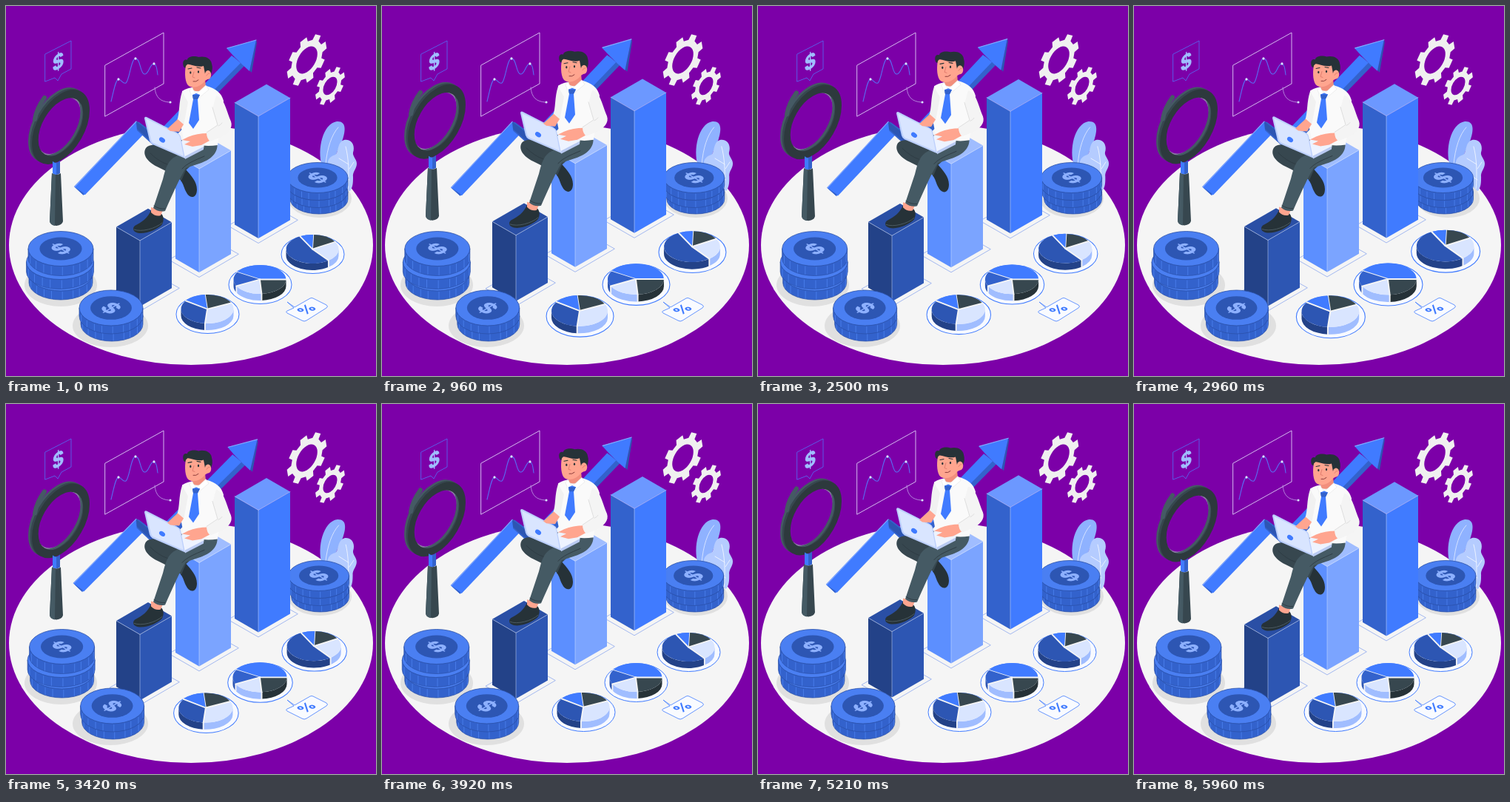
Animation, 500 px wide and 500 px high, one loop 6000 ms. Source, as an HTML page:

```html
<!DOCTYPE html>
<html lang="en">
<head>
<meta charset="utf-8">
<title>Growth chart</title>
<style>
html, body { margin: 0; width: 100%; height: 100%; overflow: hidden; background: #7c00a8; }
svg { display: block; width: 100vw; height: 100vh; }
text { font-family: Inter, "Liberation Sans", sans-serif; font-weight: 800; text-anchor: middle; }
</style>
</head>
<body>
<svg id="stage" viewBox="0 0 500 500"></svg>
<script>
const BLUE = '#407bff', MID = '#3362cc', DEEP = '#2d56b3', SOFT = '#a0bdff', PALE = '#d9e5ff';
const INK = '#263238', SLATE = '#37474f', GREY = '#455a64', SKIN = '#ffa58f';

const path = (d, fill, extra = '') => `<path d="${d}" fill="${fill}" ${extra}/>`;
const line = (d, stroke, width = 1) =>
  path(d, 'none', `stroke="${stroke}" stroke-width="${width}" stroke-linecap="round" stroke-linejoin="round"`);
const oval = (x, y, rx, ry, fill, extra = '') =>
  `<ellipse cx="${x}" cy="${y}" rx="${rx}" ry="${ry}" fill="${fill}" ${extra}/>`;
const group = (id, body) => `<g id="${id}">${body}</g>`;
const sign = (char, x, y, size, fill, axes) =>
  `<text transform="matrix(${axes} ${x} ${y})" y="${size * 0.36}" font-size="${size}" fill="${fill}">${char}</text>`;

// Isometric planes: an upright wall and two ways to lie on the floor
const WALL = '.866 -.5 0 1', FLOOR = '.866 -.5 .866 .5', FLOOR_TURNED = '.866 .5 -.866 .5';
const inWall = (x, y, body) => `<g transform="matrix(${WALL} ${x} ${y})">${body}</g>`;

function gear(x, y, outer, root, hole) {
  const teeth = 8, step = 2 * Math.PI / teeth, points = [];
  for (let i = 0; i < teeth; i++) {
    const mid = -1.745 + i * step;
    [[-0.3, root], [-0.21, outer], [0.21, outer], [0.3, root]].forEach(([turn, r]) => {
      const a = mid + turn * step;
      points.push(`${(r * Math.cos(a)).toFixed(2)},${(r * Math.sin(a)).toFixed(2)}`);
    });
  }
  const ring = `M${-hole},0a${hole},${hole} 0 1 0 ${2 * hole},0a${hole},${hole} 0 1 0 ${-2 * hole},0Z`;
  return inWall(x, y, path(`M${points.join('L')}Z${ring}`, '#f0f0f0', 'fill-rule="evenodd"'));
}

function coin(x, y, rx, ry, h, mark) {
  let out = path(`M${x - rx},${y}v${h}A${rx},${ry} 0 0 0 ${x + rx},${y + h}v${-h}Z`, MID, 'stroke="#2a50a6" stroke-width=".7"');
  for (let a = 0.25; a < 3; a += 0.16 + 0.2 * Math.abs(Math.sin(a * 7))) {
    out += line(`M${x + rx * Math.cos(a)},${y + ry * Math.sin(a) + 1.5}v${h - 2.5}`, '#5187f5', 0.7);
  }
  out += oval(x, y, rx, ry, '#4a7ff2', 'stroke="#2a50a6" stroke-width=".8"');
  if (mark) {
    out += oval(x, y, rx * 0.65, ry * 0.66, DEEP) + sign('$', x, y, 28, '#8db0ff', mark);
  }
  return out;
}

function bar(x, top, base, left, right, lid) {
  const a = 32, b = 43, da = 18.5, db = 24.8;
  return line(`M${x + 53},${base - 24.5}L${x},${base + 6.5}L${x - 41},${base - 17}L${x + 12},${base - 47.5}Z`, '#8fa9ee', 0.8)
    + path(`M${x},${top}l${-a},${-da}V${base - da}L${x},${base}Z`, left)
    + path(`M${x},${top}l${b},${-db}V${base - db}L${x},${base}Z`, right)
    + path(`M${x},${top}l${-a},${-da}l${b},${-db}l${a},${da}Z`, lid)
    + line(`M${x - a},${top - da}L${x},${top}l${b},${-db}M${x},${top}V${base}`, 'rgba(217,229,255,.6)', 0.8);
}

// Slices: [from, to, top colour, side colour] in degrees, clockwise from the right
function pie(x, y, slices) {
  const rx = 35.5, ry = 19.5, depth = 9;
  const at = deg => [x + rx * Math.cos(deg * Math.PI / 180), y + ry * Math.sin(deg * Math.PI / 180)];
  let sides = '', tops = '';
  for (const [from, to, top, side] of slices) {
    const [x1, y1] = at(from), [x2, y2] = at(to), big = to - from > 180 ? 1 : 0;
    const lo = Math.max(from, 0), hi = Math.min(to, 180);
    if (lo < hi) {
      const [u1, v1] = at(lo), [u2, v2] = at(hi);
      sides += path(`M${u1},${v1}A${rx},${ry} 0 0 1 ${u2},${v2}v${depth}A${rx},${ry} 0 0 0 ${u1},${v1 + depth}Z`, side);
    }
    tops += path(`M${x},${y}L${x1},${y1}A${rx},${ry} 0 ${big} 1 ${x2},${y2}Z`, top);
    sides += line(`M${x1},${y1}v${y1 > y ? depth : 0}`, '#f5f5f5', 1.8);
    tops += line(`M${x},${y}L${x1},${y1}`, '#f5f5f5', 1.8);
  }
  return oval(x + 0.5, y + 7, 42.5, 26, '#f8faff', `stroke="${BLUE}" stroke-width="1"`) + sides + tops;
}

const panel = line('M134,80L213,36V105L134,149Z', '#d3b8ee', 1)
  + line('M142,129C146,113 148,100 152,99C156,99 158,106 162,104C167,100 169,71 175,71C182,71 181,91 187,92C193,93 194,78 200,78C204,79 204,87 205,93', '#5a6cf2', 1.1)
  + [[152, 99], [175, 71], [200, 78]].map(([x, y]) => oval(x, y, 1.6, 1.8, PALE)).join('')
  + line('M201,110C202,124 209,129 220,130', '#b98fe0', 0.9) + oval(222, 130, 1.6, 1.6, PALE);

const dollarNote = line('M53,65L88,47V85L75,92L70,101L66,97L53,102Z', '#5a62ee', 0.9)
  + sign('$', 70.5, 75, 28, SOFT, WALL);

const percentNote = path('M390,407L411,395Q413,394 415,395L433,404Q436,406 433,408L406,425Q403,427 400,425L380,415Q377,413 380,412L389,408L380,400Z', '#f9fbff', `stroke="${BLUE}" stroke-width=".8"`)
  + sign('%', 406, 410, 20, BLUE, FLOOR);

const plant = path('M427,216C420,194 428,159 447,156C460,155 459,168 455,180C451,192 444,200 440,222Z', '#8fb2ff')
  + line('M432,214C434,192 440,174 449,164', '#dce7ff', 0.9)
  + path('M436,222C432,208 438,203 445,201C450,198 447,184 457,181C468,179 472,190 469,198C468,203 474,207 474,213C474,220 468,224 469,231C469,238 469,244 465,250L440,245Z', '#b5ccff')
  + line('M462,247C464,226 463,205 459,190M464,220L470,211M463,214L450,206M464,235L445,222', '#f0f5ff', 0.9);

const arrow = path('M92,244L176,156L180,158L190,169L107,255L104,255Z', BLUE)
  + path('M92,244L105,253V256Z', MID)
  + path('M176,156L180,157L224,190L215,203L177,168Z', MID)
  + path('M176,156L217,188L215,199L177,166Z', DEEP)
  + path('M210,170L308,69L322,81L215,190Z', MID)
  + path('M208,168L305,67L317,77L212,184Z', BLUE)
  + path('M338,46L339,49L332,90L329,87Z', DEEP)
  + path('M298,57L338,46L329,88L319,79L307,67Z', BLUE)
  + line('M93,244L176,156M299,57L338,46', '#82a8ff', 1.2);

const lens = (dx, dy, r) => inWall(69 + dx, 160.5 + dy, `<circle r="${r}"/>`);
const ringAt = (x, y, r, hole, fill) => inWall(x, y,
  `<circle r="${(r + hole) / 2}" fill="none" stroke="${fill}" stroke-width="${r - hole}"/>`);
const magnifier = ringAt(71.5, 162, 39, 34, '#8d7aa6') + ringAt(69, 160.5, 45, 36.5, GREY)
  + ringAt(71.5, 162, 45, 37, SLATE) + ringAt(74, 163.5, 45, 35, '#2d393d')
  + line('M39,153C41,141 46,132 52,124', GREY, 6)
  + path('M63,210Q68,214 73,209V226Q68,230 63,226Z', MID) + path('M63,210Q66,213 68,212V228Q65,228 63,226Z', BLUE)
  + path('M62,226Q68,230 74,226L77,291Q76,296 68,297Q60,296 59,291Z', SLATE)
  + path('M62,226Q65,228 67,228L66,297Q60,296 59,291Z', GREY);

const shoes = path('M236,224L243,221C250,229 258,237 258,248C258,259 250,261 245,254C240,246 240,240 236,236Z', INK)
  + path('M196,276L209,280C213,283 214,289 211,295C206,301 191,308 180,307C172,306 170,301 174,297C184,292 192,286 196,276Z', INK)
  + line('M173,302C183,306 202,301 211,293', '#4b5a61', 1);
const legs = path('M196,272L212,276L209,283Q202,285 196,279Z', SKIN)
  + path('M232,180L278,190L243,222L237,236Q223,226 204,217C190,210 184,200 189,192Q193,187 204,188Z', SLATE)
  + path('M285,182C288,196 280,206 264,212L243,219C236,230 226,252 215,277Q206,279 199,273L212,234C216,218 219,208 230,203L250,188Z', GREY)
  + line('M200,270Q207,275 215,274M238,220C244,213 254,209 268,203M195,199Q206,210 218,214', '#2e3c43', 0.9);
const torso = path('M238,115Q246,110 254,110L271,108C284,112 291,117 294,128L286,188Q262,192 240,181L236,160Z', '#fafafa')
  + path('M238,116C233,130 235,146 231,155L240,162L246,130Z', '#f1f1f1')
  + path('M251,104L269,98L270,110Q262,118 253,114Z', '#f28f7d')
  + path('M251,110L257,119L270,107L274,113L261,124L257,120L252,124L248,114Z', '#fff', 'stroke="#dedede" stroke-width=".5"')
  + path('M252,120L257,118L262,120L259,126L261,154L253,166L247,158L253,126Z', BLUE) + path('M252,120L262,120L259,126H253Z', MID);
const laptop = path('M239,179L268,186L267,193L242,206L232,194Z', '#eef3ff') + path('M242,203L267,190V194L242,207Z', '#b9caf2')
  + path('M187,152Q187,149 190,150L231,171Q235,173 236,176L242,206L198,187Q195,185 194,182Z', '#bccffc')
  + path('M189,152L232,173Q234,174 235,177L240,203L199,185Q197,184 196,181Z', PALE)
  + oval(211, 181, 4.4, 3, BLUE, 'transform="rotate(35 211 181)"');
const arms = path('M232,153L240,160L234,170L222,169L218,166Z', SKIN)
  + path('M273,172L277,181L264,188L252,190L241,187L249,183L238,181L246,177Q258,172 273,172Z', SKIN)
  + path('M284,121C295,124 297,139 304,156C307,165 300,172 291,177L276,183Q271,179 271,171L286,161L279,139Z', '#f4f4f4')
  + line('M279,137L286,161L271,171M287,162Q290,161 292,158', '#d9d9d9', 0.8);
const head = path('M243,80C241,92 242,104 247,108C253,112 263,109 269,101L276,97L276,76L248,74Z', SKIN)
  + path('M240,82C238,76 240,71 245,73C245,68 255,67 260,69C268,67 277,70 278,78Q280,85 277,92L274,88L269,92Q268,86 267,81C258,84 249,78 245,79Q243,80 242,84Z', INK)
  + oval(273, 93, 4.2, 6, SKIN) + line('M271,94Q273,90 275,91', '#e27f70', 0.9)
  + oval(249.3, 90, 1.1, 1.8, INK) + oval(260, 89, 1.1, 1.8, INK)
  + line('M246,85L251,84M258,83L263,84', INK, 1.1)
  + line('M254,89L252,96L255,97', '#e27f70', 1) + line('M253,102Q257,103 260,100', '#8e3e3c', 1);

const bars = bar(341, 149, 314, MID, BLUE, '#6c98ff')
  + bar(261, 220, 360, '#5c8fff', '#7ba4ff', SOFT)
  + bar(181, 317, 406, '#234288', DEEP, '#2a4fa5');

const pies = pie(272, 409.5, [[-95, -25, SLATE, INK], [-25, 95, PALE, SOFT], [95, 215, DEEP, '#234288'], [215, 265, BLUE, MID]])
  + pie(343, 369.5, [[-150, 0, BLUE, MID], [0, 86, SLATE, INK], [86, 153, PALE, SOFT], [153, 210, MID, DEEP]])
  + pie(414, 328.5, [[-88, -30, SLATE, INK], [-30, 52, PALE, SOFT], [52, 242, DEEP, '#234288'], [242, 272, BLUE, MID]]);

const shadow = (x, y, rx, ry) => oval(x, y, rx, ry, '#e0e0e0');
const stage = document.getElementById('stage');
stage.innerHTML = `<rect width="500" height="500" fill="#7c00a8"/>`
  + oval(250, 323, 246, 162, '#f5f5f5')
  + gear(406.5, 73, 31, 24.5, 16.5) + gear(438, 108, 23, 17.5, 11)
  + dollarNote + panel
  + group('plant', plant)
  + shadow(424, 260, 43, 26)
  + group('coinsRight', coin(423, 251, 39, 20, 10) + coin(421, 242, 40, 20.5, 10) + coin(421, 232, 41, 20.5, 10, FLOOR))
  + group('arrow', arrow) + group('magnifier', magnifier)
  + group('climber', bars + shoes + legs + torso + laptop + arms + head)
  + group('pies', pies) + percentNote
  + shadow(74, 377, 49, 29) + shadow(141, 432, 51, 29)
  + group('coinsLeft', coin(74, 362, 43, 23, 12) + coin(73, 346, 45.5, 23.5, 13) + coin(74, 328, 44, 23.5, 13, FLOOR))
  + group('coinsFront', coin(143, 419, 42, 23, 11) + coin(142, 408, 43, 24, 11, FLOOR_TURNED));

// Linear interpolation through [position, value] stops
function tween(p, stops) {
  const i = stops.findIndex(([at]) => p < at);
  const [p0, v0] = stops[i - 1], [p1, v1] = stops[i];
  return v0 + (v1 - v0) * (p - p0) / (p1 - p0);
}
const FLOAT = [[0, 0], [0.5, -10], [1, 0]];
const WIND = [[0, 0], [0.25, 1], [0.75, -1], [1, 0]];
const BEAT = [[0, 1], [0.1, 1.1], [0.3, 1], [0.4, 1], [0.5, 1.1], [0.6, 1], [1, 1]];
const SHAKE = [0, -1, 2, -4, 4, -4, 4, -4, 2, -1, 0].map((x, i) => [i / 10, x]);

const move = (id, value) => document.getElementById(id).setAttribute('transform', value);

function draw(ms) {
  const quick = ms % 1500 / 1500, slow = ms % 6000 / 6000;
  const lift = `translate(0 ${tween(quick, FLOAT)})`;
  const slide = `translate(${tween(slow, SHAKE)} 0)`;
  const sway = tween(quick, WIND);
  ['climber', 'magnifier'].forEach(id => move(id, lift));
  ['coinsLeft', 'coinsFront', 'coinsRight'].forEach(id => move(id, slide));
  move('arrow', `rotate(${sway} 216 150)`);
  move('plant', `rotate(${sway} 449 203)`);
  move('pies', `translate(343.5 376) scale(${tween(slow, BEAT)}) translate(-343.5 -376)`);
}

const start = performance.now();
function tick() {
  draw(performance.now() - start);
  requestAnimationFrame(tick);
}
draw(0);
requestAnimationFrame(tick);
</script>
</body>
</html>
```
